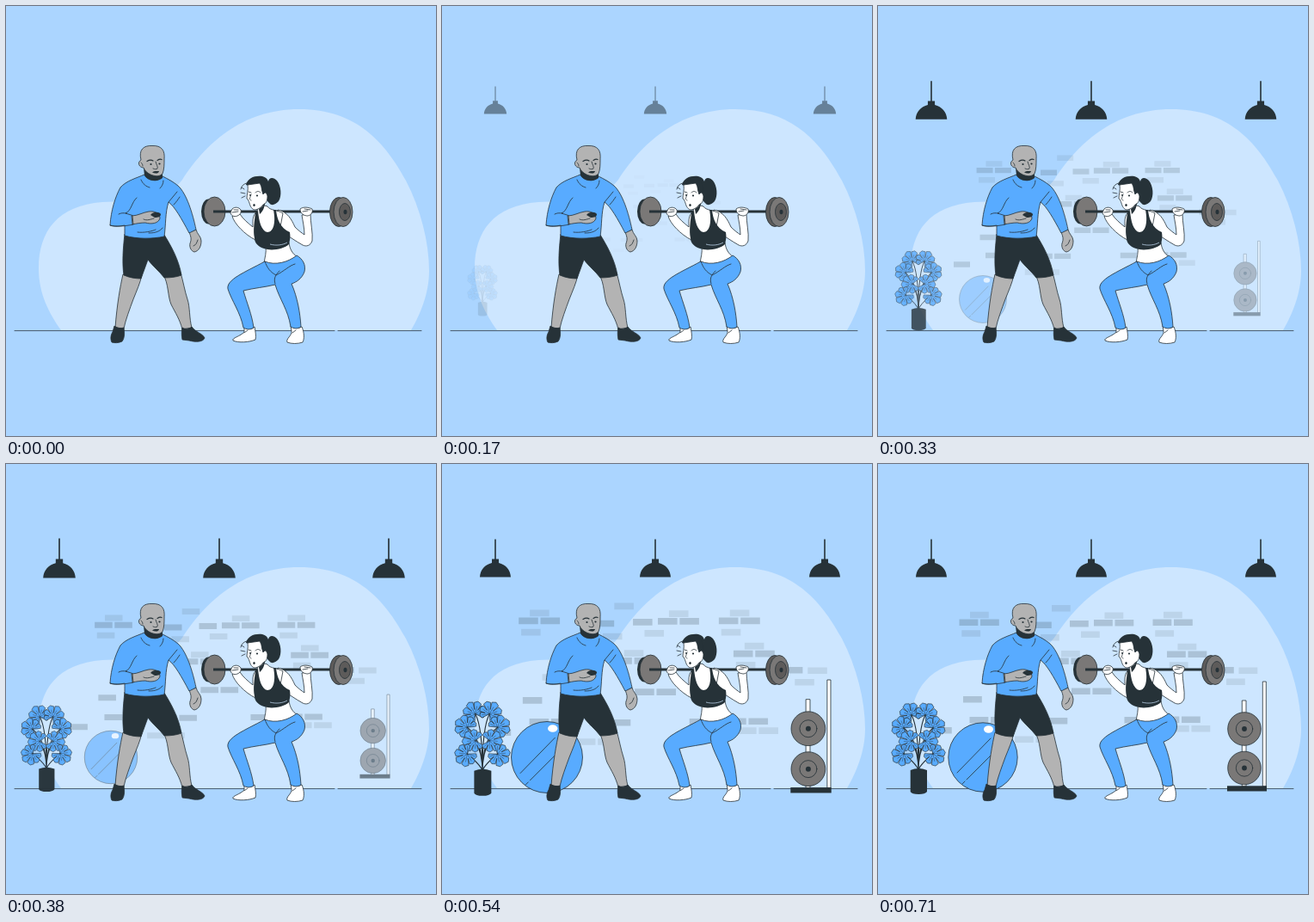
An HTML page that plays this animation: 500 px wide and 500 px high, repeating every 750 ms.

```html
<!DOCTYPE html>
<html lang="en">
<head>
<meta charset="utf-8">
<title>Squat training</title>
<style>
  html, body { margin: 0; width: 100%; height: 100%; overflow: hidden; background: #abd5ff; }
  svg { display: block; width: 100vw; height: 100vh; }
  .ln { fill: none; stroke: #263238; stroke-width: .8; stroke-linecap: round; stroke-linejoin: round; }
  .o { stroke: #263238; stroke-width: .8; stroke-linejoin: round; }
  .blue { fill: #58abff; }
  .dark { fill: #263238; }
  .skin { fill: #b3b3b3; }
  .white { fill: #fff; }
  .plate { fill: #7a7877; }
</style>
</head>
<body>
<svg viewBox="0 0 500 500">
  <rect width="500" height="500" fill="#abd5ff"/>
  <path fill="#cde6ff" d="M64 377C50 357 38 335 38 305C38 262 60 232 112 228C150 226 180 233 205 202C231 162 273 120 341 120C408 120 441 159 465 203C482 236 492 274 492 308C492 335 481 360 471 377Z"/>
  <g id="bricks"></g>
  <path class="ln" style="stroke-width:1;opacity:.75" d="M10 377.6H382M386 377.6H483"/>

  <g id="plant"></g>

  <g id="ball">
    <circle class="blue o" cx="122" cy="341" r="40.2"/>
    <ellipse class="white" cx="128.5" cy="308.5" rx="5.5" ry="4.2"/>
    <path class="ln" d="M92 359L131 319M103 367L143 327M98 372L101 369"/>
  </g>

  <g id="rack">
    <rect class="white o" x="447.3" y="253" width="4" height="122"/>
    <rect class="white o" x="423.3" y="275" width="4.7" height="100"/>
    <rect class="dark" x="406" y="374.3" width="46" height="6.2"/>
    <g id="discs"></g>
  </g>

  <g id="lamps"></g>

  <g id="trainer">
    <path class="skin o" d="M136 312C133 325 129 347 127 374L137 375C139 365 144 352 148 341C152 331 156 322 158 313ZM183 313C189 322 188 338 192 347C197 357 202 364 205 376L216 374C213 363 214 350 211 341C208 332 206 320 203 310Z"/>
    <path class="dark o" d="M126 372C130 375 134 375 137 374C138 380 138 386 135 390C131 392 126 392 123 391C121 387 122 382 124 379ZM205 374C208 376 213 376 216 373C220 379 229 381 231 386C229 391 220 391 213 389L205 388C204 383 204 378 205 374Z"/>
    <path class="dark o" d="M138 265C136 283 135 299 137 313C144 316 151 317 157 317L165 295C171 303 179 309 184 316C192 316 199 315 204 313C201 295 192 279 184 266Z"/>
    <path class="skin o" d="M213 263L221 260C222 265 227 268 227 273C227 280 224 285 219 286C215 285 213 280 214 276C216 271 215 268 213 263Z"/>
    <path class="ln" d="M218 279C221 278 222 275 223 272"/>
    <path class="blue o" d="M161 196C152 200 140 203 133 211C127 222 122 238 121 255C126 257 133 256 138 255C138 260 138 264 138 267C152 271 170 271 184 268C186 255 185 240 189 228C196 233 204 247 213 264L221 260C217 241 210 218 200 209C194 204 188 201 182 198C176 205 165 204 161 196Z"/>
    <path class="skin o" d="M146 244C153 244 159 240 166 239C173 238 179 241 179 247C177 253 169 254 162 252C157 252 151 253 147 254Z"/>
    <path class="ln" d="M152 223C146 228 146 238 139 241L147 243.5L148 254C139 256 128 257 121 255M131 242C135 240 137 241 140 241M157 202C159 207 163 210 167 211M183 203C183 207 181 210 179 212M153 263C160 264 170 262 174 260M166 264C174 264 179 262 182 258M189 228C192 224 196 220 199 216M195 231C198 228 200 225 202 222"/>
    <path class="dark" d="M168 243C171 239 178 239 180 242C180 245 177 246 173 246Z"/>
    <path class="ln" d="M160 248C164 250 168 248 172 247"/>
    <path class="dark" d="M160 188L161 197C165 204 177 205 182 200L182 190Z"/>
    <path class="skin o" d="M157 179C154 167 160 162 170 162.5C181 162 185 168 184 178C184 184 184 190 182 195C178 199 173 198 168 196C164 194 161 191 160 188C155 188 152 182 157 179Z"/>
    <path class="ln" d="M157 182C158 183 159 184 159 186M174 181C175 185 177 187 176 189C175 190 173 190 171 189"/>
    <path class="ln" style="stroke-width:1.2" d="M164 180.5Q168 178 171 180M176 179.5Q179 177.5 181 178.500"/>
    <circle class="dark" cx="168.500" cy="184" r="1.100"/>
    <circle class="dark" cx="178.500" cy="183.500" r="1.100"/>
    <path class="dark" d="M170 193.500C172 191.500 175 192 178 192C178 194.500 174 195.500 170 193.500Z"/>
  </g>

  <g id="lifter">
    <path class="white o" d="M277 373C281 376 286 376 289 373C290 378 291 384 290 388C283 391 270 392 264 389C262 386 273 384 277 379ZM331 372C335 375 340 375 344 373C347 380 347 387 345 391C339 393 332 393 327 391C325 387 333 383 332 378Z"/>
    <path class="ln" d="M277 380L281 377M333 380L337 377"/>
    <path class="white o" d="M302 279C303 287 301 292 300 299C314 303 330 301 339 292C333 288 330 283 329 275Z"/>
    <path class="blue o" d="M338 290C345 294 349 301 347 309C344 317 338 321 332 323C339 339 342 357 343 373C339 376 334 375 331 373C328 353 318 341 313 324C301 327 288 328 276 331C280 345 286 359 288 374C284 377 279 376 276 374C273 357 262 342 258 329C256 318 277 310 301 297C313 302 328 298 338 290Z"/>
    <path class="ln" d="M301 297C304 305 307 309 314 313C324 308 329 302 336 300M313 323C311 317 313 313 318 308"/>

    <ellipse class="dark" cx="235.500" cy="239" rx="8.500" ry="14.500"/>
    <ellipse class="plate o" cx="242.500" cy="239" rx="12.500" ry="17"/>
    <path class="dark" d="M241 237.600H390V240.400H241Z"/>

    <path class="white o" d="M316 237C327 239 332 248 336 257C340 261 344 264 347 266C347 258 345 250 344 243L354 242C354 252 357 264 356 273C354 279 349 280 345 278C336 273 328 267 318 261Z"/>
    <path class="white o" d="M292 239C286 243 287 252 287 257C281 252 276 248 272 242L263 244C265 253 278 266 290 272L302 270L318 262L322 241C316 237 307 238 304 233L294 230Z"/>
    <path class="white o" d="M263 236C266 233 271 234 273 237C274 240 272 243 269 244C265 246 261 243 261 240ZM342 236C346 233 352 234 356 236C357 240 355 243 351 244C346 244 342 241 342 236Z"/>
    <path class="ln" d="M263 240L270 239M265 237L270 237M345 239L351 238M347 236L354 237"/>
    <path class="dark" d="M290 240L293 238C294 250 297 262 304 263C311 263 314 252 311 237L314 237C315 248 319 258 330 263C331 268 330 273 329 277C323 283 308 285 300 282C294 280 289 276 289 270C287 261 289 250 290 240Z"/>
    <path fill="none" stroke="#cde6ff" stroke-width=".7" d="M307 277C314 279 322 278 327 275"/>

    <ellipse fill="#5d5b5a" class="o" cx="387" cy="239.500" rx="10.500" ry="17"/>
    <ellipse class="plate o" cx="392" cy="239.500" rx="11" ry="17"/>
    <ellipse fill="#5d5b5a" class="o" cx="394" cy="239.500" rx="6.500" ry="10"/>
    <ellipse class="dark" cx="394.500" cy="239.500" rx="2" ry="2.800"/>

    <path class="dark" d="M279 208C281 200 289 197 298 198C302 199 304 201 305 204C306 199 311 199 315 203C320 209 321 221 317 227C313 231 309 233 306 229C303 227 302 222 302 218L292 212Z"/>
    <path class="white o" d="M281 208C282 214 280 219 280 224C282 225 282 227 283 229C284 233 286 237 290 237C294 236 297 234 299 231C302 230 304 227 304 221C303 216 300 216 299 219C297 215 298 210 295 206Z"/>
    <path class="dark" d="M279 208C284 207 290 205 295 205C298 209 297 214 299 219C302 216 304 218 304 213L301 203L291 199Z"/>
    <path class="dark" d="M294 236C297 234 299 232 301 229C301 234 298 240 295 242Z"/>
    <path class="ln" d="M285 219C284 223 282 225 285 226M282 216L285 217M290 217C292 215 294 215 296 217"/>
    <circle class="dark" cx="284" cy="220" r=".9"/>
    <circle class="dark" cx="292" cy="220.500" r="1.100"/>
    <ellipse class="dark" cx="288.500" cy="231.500" rx="1.200" ry="1.500"/>
    <path class="ln" d="M280 206C276 207 274 209 273 213M277 213L274 211M278 218L273 217M278 221L274 223"/>
  </g>
</svg>
<script>
const get = id => document.getElementById(id);
const FRAME = 1000 / 24, LOOP = 750;

// Bricks: single ones, side-by-side pairs, and stacks of a pair between two pale bricks.
const walls = { dark: '', pale: '' };
const brick = (tone, x, y) => walls[tone] += `M${x} ${y}h21.8v7.4h-21.8z`;
const pair = (tone, x, y) => { brick(tone, x, y); brick(tone, x + 24.5, y); };
const stack = (x, y) => {
  brick('pale', x + 12.5, y - 8.7);
  pair('dark', x, y);
  brick('pale', x + 2.8, y + 12.8);
};
stack(94.5, 180.5);
stack(319.5, 180.5);
stack(336, 217.5);
for (const [x, y] of [[251, 181], [200, 225.5], [225, 260.5], [106.5, 294], [174, 295], [286.5, 294], [328.5, 293.5]])
  pair('dark', x, y);
for (const [x, y] of [[159, 316.5], [340, 304]]) pair('pale', x, y);
for (const [x, y] of [[180, 183.5], [223, 182], [392, 236], [99, 270], [64, 306]]) brick('dark', x, y);
for (const [x, y] of [[202, 164], [189, 198], [263.5, 172.5], [236, 194.5], [213, 217], [121, 244], [419.5, 236.5], [405, 249.5]])
  brick('pale', x, y);
get('bricks').innerHTML =
  `<path class="dark" opacity=".2" d="${walls.dark}"/><path class="dark" opacity=".1" d="${walls.pale}"/>`;

// A split leaf: seven pointed lobes, longest at the tip.
function leaf(x, y, r, turn) {
  const at = (a, k) => `${(Math.sin(a) * r * k).toFixed(1)} ${(-Math.cos(a) * r * k).toFixed(1)}`;
  let d = 'M0 0', veins = '';
  for (let i = -3; i <= 3; i++) {
    const a = i * .74, k = 1 + .2 * Math.cos(a);
    d += `L${at(a - .32, k * .9)}L${at(a, k)}L${at(a + .32, k * .9)}`;
    if (i < 3) d += `L${at(a + .37, .4)}`;
    veins += `M0 0L${at(a, .7)}`;
  }
  return `<g transform="translate(${x} ${y}) rotate(${turn})"><path class="blue o" style="stroke-width:.6" d="${d}Z"/>` +
    `<path class="ln" style="stroke-width:.4" d="${veins}"/></g>`;
}
let stems = '', leaves = '';
for (let tier = 0; tier < 4; tier++) {
  for (const side of [-1, 1]) {
    const x = 47 + side * (tier % 2 ? 17 : 8), y = 292 + tier * 15;
    stems += `M47 357Q47 ${y + 14} ${x} ${y}`;
    leaves += leaf(x, y, 12.5, side * (30 + 32 * tier));
  }
}
get('plant').innerHTML = `<path class="ln" style="stroke-width:1.1" d="${stems}"/>${leaves}` +
  '<path class="dark" d="M37.7 356Q47 352 57 356V381Q55 384 47.3 384Q39 384 37.7 381Z"/>';

get('discs').innerHTML = [308, 353.5].map(y =>
  `<circle class="plate o" cx="426" cy="${y}" r="19.3"/><circle class="ln" cx="426" cy="${y}" r="9.7"/>` +
  `<circle class="dark" cx="426" cy="${y}" r="2.9"/>`).join('');

const lampX = [62, 248, 445];
get('lamps').innerHTML = lampX.map((x, i) =>
  `<g id="lamp${i}"><g transform="translate(${x} 0)" class="dark"><path d="M-.8 87.5H.8V111H-.8Z"/>` +
  '<path d="M-4 110.5H4V115C12 117 17.5 123 18 131.5H-18C-17.5 123 -12 117 -4 115Z"/></g></g>').join('');

// Pop-in parts: element, centre, delay in frames.
const parts = [
  [get('bricks'), 250, 238, 0],
  [get('plant'), 47, 331, 0],
  [get('ball'), 122, 341, 2.3],
  [get('rack'), 429, 317, 2.3],
  ...lampX.map((x, i) => [get('lamp' + i), x, 109.5, -2.3])
];

const unit = v => Math.min(1, Math.max(0, v));

// Grows from half size, swells slightly past full size, then settles.
const sizeAt = p => .5 + .5 * (p + .37 * Math.sin(Math.PI * p ** 1.6));

function draw(ms) {
  const step = Math.floor((ms % LOOP + 5) / FRAME) % 18;
  for (const [el, x, y, delay] of parts) {
    const n = step - delay, size = sizeAt(unit((n - 3) / 11));
    el.setAttribute('transform', `translate(${x} ${y}) scale(${size}) translate(${-x} ${-y})`);
    el.setAttribute('opacity', unit((n - 3.3) / 5.9));
  }
}

function tick() {
  draw(performance.now());
  requestAnimationFrame(tick);
}
tick();
</script>
</body>
</html>
```
